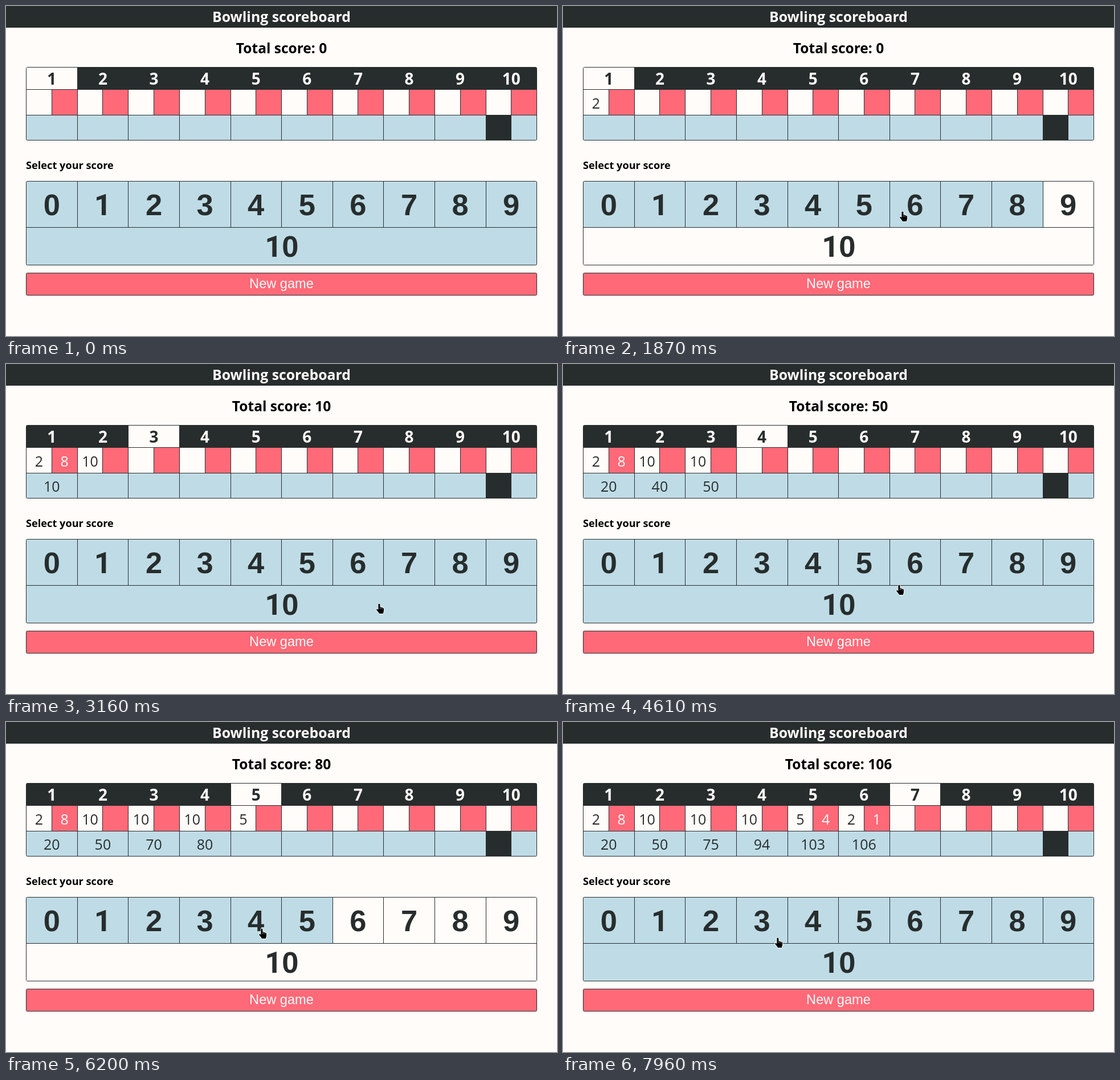
An HTML page that plays this animation: 967 by 579 pixels, repeating every 7.99 s.

```html
<!DOCTYPE html>
<html lang="en">
<head>
<meta charset="utf-8">
<title>Bowling scoreboard</title>
<style>
  html, body { margin: 0; width: 100%; height: 100%; overflow: hidden; background: #fffcf9; }
  svg { display: block; position: absolute; left: 0; top: 0; }
  text { font-family: "Open Sans", "Noto Sans", sans-serif; text-anchor: middle; }
  .bold { font-weight: 700; }
  .key { font: 700 52.5px "Liberation Sans", Arial, sans-serif; }
  .one { font-family: Roboto, sans-serif; }
  .new { font-family: "Liberation Sans", Arial, sans-serif; }
  .left { text-anchor: start; }
</style>
</head>
<body>
<svg width="967" height="579" viewBox="0 0 967 579">
  <g id="board"></g>
  <g id="cursor" fill="#000" stroke="#fff" stroke-linejoin="round" paint-order="stroke">
    <g id="hand">
      <path stroke-width="1.6" d="M4.4 11V2a1.5 1.5 0 0 1 3 0v4.6c1-.5 2-.2 2.4.6c1-.4 2-.1 2.3.8c1-.3 2 .2 2 1.3v3.4c0 2-1 3-1.3 5.4H6c-.5-2-2.5-3.4-4.5-6.4c-.9-1.6 1-2.4 2.9-.7z"/>
      <path fill="none" stroke-width=".5" d="M7.4 7v3M9.8 7.5v2.6M12.1 8.3v2"/>
    </g>
    <path id="arrow" stroke-width="1.6" d="M5.5 .5V16.5l3.7-3.5 2.4 5.6 2.4-1-2.4-5.5h5z"/>
  </g>
</svg>
<script>
const DARK = '#272d2d', LIGHT = '#fffcf9', RED = '#ff6978', BLUE = '#bfdce6';
const LOOP = 7990, SCORE_DELAY = 60, PITCH = 89.6;

const throws = [
  { at: 970, pins: 2 }, { at: 2270, pins: 8 }, { at: 3130, pins: 10 },
  { at: 3900, pins: 10 }, { at: 4800, pins: 10 }, { at: 5890, pins: 5 },
  { at: 6430, pins: 4 }, { at: 7150, pins: 2 }, { at: 7660, pins: 1 }
];

// The pointer eases from stop to stop
const stops = [
  { x: 862, y: 600, from: 0, to: 90 },
  { x: 430, y: 222, from: 480, to: 480 },
  { x: 245, y: 366, from: 850, to: 1305 },
  { x: 790, y: 370, from: 2250, to: 2300 },
  { x: 656, y: 429, from: 2910, to: 4240 },
  { x: 591, y: 396, from: 4600, to: 5110 },
  { x: 500, y: 364, from: 5610, to: 5980 },
  { x: 440, y: 372, from: 6280, to: 6625 },
  { x: 250, y: 383, from: 6980, to: 7180 },
  { x: 170, y: 375, from: 7490, to: 7690 },
  { x: 378, y: 387, from: 7960, to: LOOP }
];

const $ = id => document.getElementById(id);
const add = (a, b) => a + b;
const col = i => Math.round(35.25 + PITCH * i);
const mid = i => 80.3 + PITCH * i;
const rect = (x, y, w, h, fill, extra = '') =>
  `<rect x="${x}" y="${y}" width="${w}" height="${h}" fill="${fill}" ${extra}/>`;
const box = (y, h, fill) => rect(35.5, y + .5, 896, h, fill, `stroke="${DARK}" rx="2"`);
const text = (x, y, s, size, fill = DARK, cls = '') =>
  `<text x="${x}" y="${y}" font-size="${size}" fill="${fill}" class="${cls}">${s}</text>`;
const key = (x, y, n) =>
  text(x, y, String(n).replace('1', '<tspan class="one">1</tspan>'), 52.5, DARK, 'key');

const rollsAt = t => throws.filter(r => r.at <= t).map(r => r.pins);
const closed = f => f.balls.length === 2 || f.balls[0] === 10;

function split(rolls) {
  const frames = [];
  for (let i = 0; i < rolls.length;) {
    const size = rolls[i] === 10 ? 1 : 2;
    frames.push({ start: i, balls: rolls.slice(i, i + size) });
    i += size;
  }
  return frames;
}

// Running totals; an unfinished frame does not count yet
function totals(rolls) {
  const done = split(rolls).filter(closed);
  const counted = done.flatMap(f => f.balls);
  let sum = 0;
  return done.map(({ start, balls }) => {
    const reach = balls.reduce(add) === 10 ? 3 : 2;
    return sum += counted.slice(start, start + reach).reduce(add);
  });
}

function board(rolls, sums) {
  const frames = split(rolls);
  const active = frames.filter(closed).length;
  const left = frames[active] ? 10 - frames[active].balls[0] : 10;
  let s = rect(0, 0, 967, 38, DARK)
    + text(483.5, 28, 'Bowling scoreboard', 24.8, LIGHT, 'bold')
    + text(483.5, 83, 'Total score: ' + (sums[sums.length - 1] || 0), 24.5, '#000', 'bold')
    + text(35, 286, 'Select your score', 18.2, '#000', 'bold left')
    + box(107, 128, BLUE) + rect(36, 108, 895, 39, DARK)
    + box(307, 147, BLUE);

  for (let i = 0; i < 10; i++) {
    const x = col(i), end = col(i + 1), half = Math.floor(mid(i)), on = i === active;
    if (on) s += rect(x + 1, 108, end - x - 1, 38, LIGHT);
    s += text(mid(i), 138, i + 1, 28, on ? DARK : LIGHT, 'bold')
      + rect(x + 1, 147, half - x - 1, 44, LIGHT)
      + rect(half + 1, 147, end - half - 1, 44, RED)
      + rect(half, 147, 1, 44, DARK);
    if (i === 9) s += rect(x, 192, half - x + 1, 43, DARK);
    if (i > left) s += rect(x + 1, 308, end - x - 1, 80, LIGHT);
    if (i) s += rect(x, 147, 1, 88, DARK) + rect(x, 308, 1, 80, DARK);
    s += key(mid(i), 367, i);
    if (frames[i]) frames[i].balls.forEach((n, b) =>
      s += text(mid(i) + PITCH * (b / 2 - .25), 180, n, 25, b ? LIGHT : DARK));
    if (i in sums) s += text(mid(i), 224, sums[i], 25);
  }
  if (left < 10) s += rect(36, 389, 895, 65, LIGHT);
  return s + rect(36, 191, 895, 1, DARK) + rect(36, 388, 895, 1, DARK)
    + key(483.8, 440, 10)
    + box(468, 39, RED) + text(483.5, 495, 'New game', 23.6, LIGHT, 'new');
}

function pointer(t) {
  const i = stops.findIndex(p => p.to > t);
  const b = stops[i], a = stops[i - 1] || b;
  const u = t >= b.from ? 1 : (t - a.to) / (b.from - a.to);
  const e = u * u * (3 - 2 * u);
  return [a.x + (b.x - a.x) * e, a.y + (b.y - a.y) * e];
}

let shown = '';
function draw() {
  const t = performance.now() % LOOP;
  const svg = board(rollsAt(t), totals(rollsAt(t - SCORE_DELAY)));
  if (svg !== shown) $('board').innerHTML = shown = svg;

  const [x, y] = pointer(t), tip = y - 9;
  const over = x > 35 && x < 932 && (tip > 307 && tip < 455 || tip > 468 && tip < 508);
  $('cursor').setAttribute('transform', `translate(${Math.round(x) - 7} ${Math.round(y) - 9})`);
  $('hand').style.display = over ? '' : 'none';
  $('arrow').style.display = over ? 'none' : '';
  requestAnimationFrame(draw);
}
draw();
</script>
</body>
</html>
```
